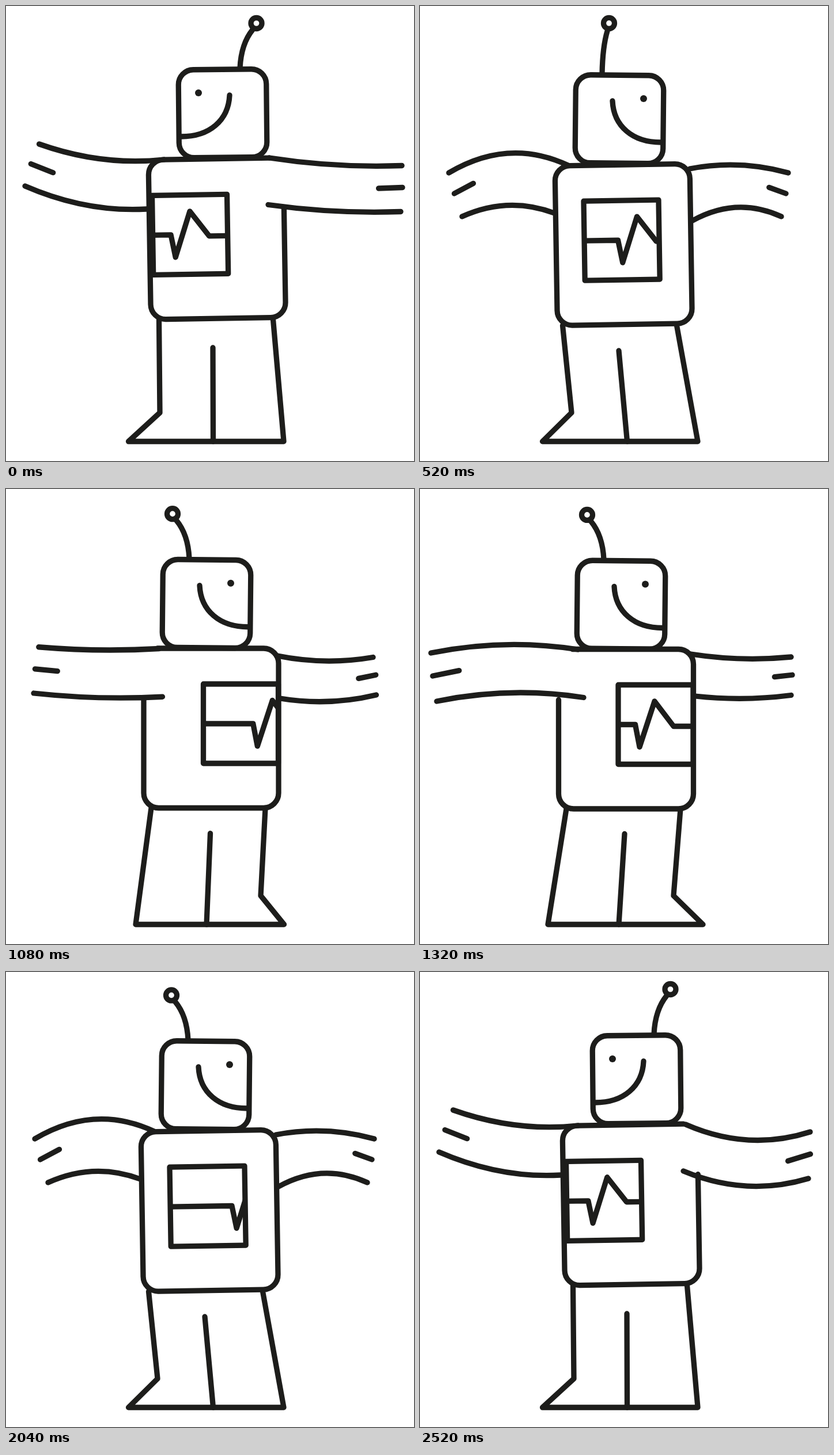
Write an HTML page with a canvas that moves like this. It is 708 px wide and 791 px high and loops after 2560 ms.

```html
<!DOCTYPE html>
<html lang="en">
<head>
<meta charset="utf-8">
<title>Dancing robot</title>
<style>
html, body { margin: 0; width: 100%; height: 100%; overflow: hidden; background: #fff; }
canvas { display: block; width: 708px; height: 791px; }
</style>
</head>
<body>
<canvas id="stage" width="708" height="791"></canvas>
<script>
const LOOP = 2560, STEP = 40, HOLD = 160, INK = '#1d1d1b';
const WIDTH = 234, HEIGHT = 277.5, FLOOR = 757;
const ctx = document.getElementById('stage').getContext('2d');

// Each arm is an upper and a lower edge: tip x, y, shoulder x, y, sag.
// face: where the head looks; near: side of the arm in front of the body.
const left = {
  face: -1, near: 1, head: [0, 0], at: [247, 267.5], tilt: -0.016, panel: 5.5,
  hip: 265.5, foot: { ankle: 267, toe: 212.5, heel: 482 }, split: [359, 359.5],
  armL: [[57.5, 240, 274, 267, 12.5], [33, 313, 244, 353, 13]],
  armR: [[687, 277.5, 457, 264, 5.5], [685, 357.5, 455, 345.5, 5]]
};
const leftDip = { ...left,
  armR: [[677, 278, 461, 265, 20.5], [674, 359, 457, 346, 19.5]]
};
const leftTurn = { ...mix(left, leftDip, 1.6),
  armL: [[40, 262, 274, 267, 4], [24, 338, 244, 353, 5]]
};
const front = {
  face: 1, near: 0, head: [0, 10], at: [234, 278], tilt: -0.016, panel: 49,
  hip: 247.5, foot: { ankle: 263, toe: 212.5, heel: 482 }, split: [345, 359.5],
  armL: [[50, 290, 257, 277, -27.5], [73, 366, 233, 360, -16.5]],
  armR: [[639, 290, 468, 283, -10], [627, 366, 473, 373, -19.5]]
};
const rightDip = {
  face: 1, near: -1, head: [1, 11], at: [237.5, 275.5], tilt: 0, panel: 103.5,
  hip: 250, foot: { ankle: 444, toe: 474, heel: 228 }, split: [354, 351],
  armL: [[94.5, 264.5, 258, 276, 19], [67, 341, 259, 360, 20.5]],
  armR: [[630, 293, 472, 293, 10], [641, 357.5, 474, 368, 12]]
};
const right = {
  face: 1, near: -1, head: [3, 14.5], at: [240.5, 278.5], tilt: 0, panel: 103.5,
  hip: 254, foot: { ankle: 440, toe: 491, heel: 222 }, split: [355, 345],
  armL: [[19, 285, 274, 279, -11.5], [29, 369, 284, 362.5, -11.5]],
  armR: [[644, 292, 470, 287, 5.5], [644, 358.5, 477, 360, 5]]
};

function mix(a, b, k) {
  if (typeof a === 'number') return a + (b - a) * k;
  if (Array.isArray(a)) return a.map((v, i) => mix(v, b[i], k));
  return Object.fromEntries(Object.keys(a).map(key => [key, mix(a[key], b[key], k)]));
}

// The dance runs forward, then back; only the first step differs on return.
const forward = [left, mix(left, leftTurn, 0.5), leftTurn, front, front, rightDip, mix(rightDip, right, 0.5), right];
const dance = [...forward, ...forward.slice(1).reverse(), leftDip];

// Time and value pairs: antenna lean, and place of the heartbeat in its panel.
const LEAN = [[480, 28.5], [520, 12], [560, -21], [600, -29], [2040, -29], [2080, -24], [2120, 24], [2160, 28.5]];
const PULSE = [[0, 39], [480, -31], [480, 74], [800, 10], [800, 160], [1760, -67], [1760, 155], [2560, 39]];

function track(keys, t) {
  const i = keys.findIndex(k => k[0] > t);
  if (i < 0) return keys[keys.length - 1][1];
  if (i === 0) return keys[0][1];
  const [t0, a] = keys[i - 1], [t1, b] = keys[i];
  return mix(a, b, (t - t0) / (t1 - t0));
}

function line(...p) {
  ctx.beginPath();
  for (let i = 0; i < p.length; i += 2) ctx.lineTo(p[i], p[i + 1]);
  ctx.stroke();
}

function dot(x, y, r, paint) {
  ctx.beginPath();
  ctx.arc(x, y, r, 0, 2 * Math.PI);
  ctx[paint]();
}

function box(x, y, w, h) {
  ctx.beginPath();
  ctx.roundRect(x, y, w, h, 26);
  ctx.stroke();
}

function curve(x, y, ...rest) {
  ctx.beginPath();
  ctx.moveTo(x, y);
  if (rest.length > 4) ctx.bezierCurveTo(...rest);
  else ctx.quadraticCurveTo(...rest);
  ctx.stroke();
}

function drawArm(edges) {
  let x = 0, y = -2, dx = 0, dy = 0;
  for (const [tx, ty, sx, sy, sag] of edges) {
    const ux = (sx - tx) / 3, uy = (sy - ty) / 3, bend = sag * 4 / 3;
    curve(tx, ty, tx + ux, ty + uy + bend, sx - ux, sy - uy + bend, sx, sy);
    x += tx / 2;
    y += ty / 2;
    dx += ux;
    dy += uy + bend;
  }
  // The finger mark continues the direction of both edges.
  const k = 0.27;
  x -= 2 * Math.sign(dx);
  line(x, y, x + dx * k, y + dy * k);
}

function drawLegs({ hip, foot: { ankle, toe, heel }, split, at }) {
  const y = at[1] + HEIGHT, hips = [hip, hip + 198];
  if (toe > heel) hips.reverse();
  line(hips[0], y, ankle, 707, toe, FLOOR, heel, FLOOR, hips[1], y);
  line(split[0], 594 + (at[1] - 267.5) / 2, split[1], FLOOR);
}

function drawBody({ near, at, tilt, panel }, offset) {
  ctx.save();
  ctx.translate(...at);
  ctx.rotate(tilt);
  if (near) {
    const side = x => near > 0 ? x : WIDTH - x;
    ctx.beginPath();
    ctx.moveTo(side(210), 0);
    ctx.arcTo(side(0), 0, side(0), HEIGHT, 26);
    ctx.arcTo(side(0), HEIGHT, side(WIDTH), HEIGHT, 26);
    ctx.arcTo(side(WIDTH), HEIGHT, side(WIDTH), 0, 26);
    ctx.lineTo(side(WIDTH), 88);
    ctx.stroke();
  } else {
    box(0, 0, WIDTH, HEIGHT);
  }
  ctx.translate(panel, 62);
  ctx.beginPath();
  ctx.rect(0, 0, 130, 138);
  ctx.stroke();
  ctx.clip();
  line(-400, 69, offset - 7.5, 69, offset, 108, offset + 26, 28.5, offset + 59, 72, 500, 72);
  ctx.restore();
}

function drawHead({ face, head }, lean) {
  ctx.save();
  ctx.translate(...head);
  ctx.save();
  if (face > 0) ctx.transform(-1, 0, 0, 1, 722, 0);
  ctx.save();
  ctx.translate(299, 111);
  ctx.rotate(-0.01);
  box(0, 0, 152.5, 153);
  ctx.restore();
  curve(388, 155, 386, 199, 353, 227, 304, 227);
  dot(334, 151, 6, 'fill');
  ctx.restore();

  ctx.translate(face > 0 ? 316 : 406, 108);
  const top = 0.015 * lean * lean - 90.2;
  curve(0, 0, lean * 0.07, top * 0.54, lean * 0.77, top * 0.855);
  dot(lean, top, 9.5, 'stroke');
  ctx.restore();
}

function draw(t) {
  const pose = dance[Math.floor(t / HOLD)];
  ctx.fillStyle = '#fff';
  ctx.fillRect(0, 0, 708, 791);
  ctx.fillStyle = ctx.strokeStyle = INK;
  ctx.lineWidth = 9.3;
  ctx.lineCap = ctx.lineJoin = 'round';
  drawLegs(pose);
  drawBody(pose, track(PULSE, t));
  drawArm(pose.armL);
  drawArm(pose.armR);
  drawHead(pose, track(LEAN, t));
}

function tick() {
  const step = Math.floor(performance.now() / STEP + 0.05);
  draw(step * STEP % LOOP);
  requestAnimationFrame(tick);
}
tick();
</script>
</body>
</html>
```
